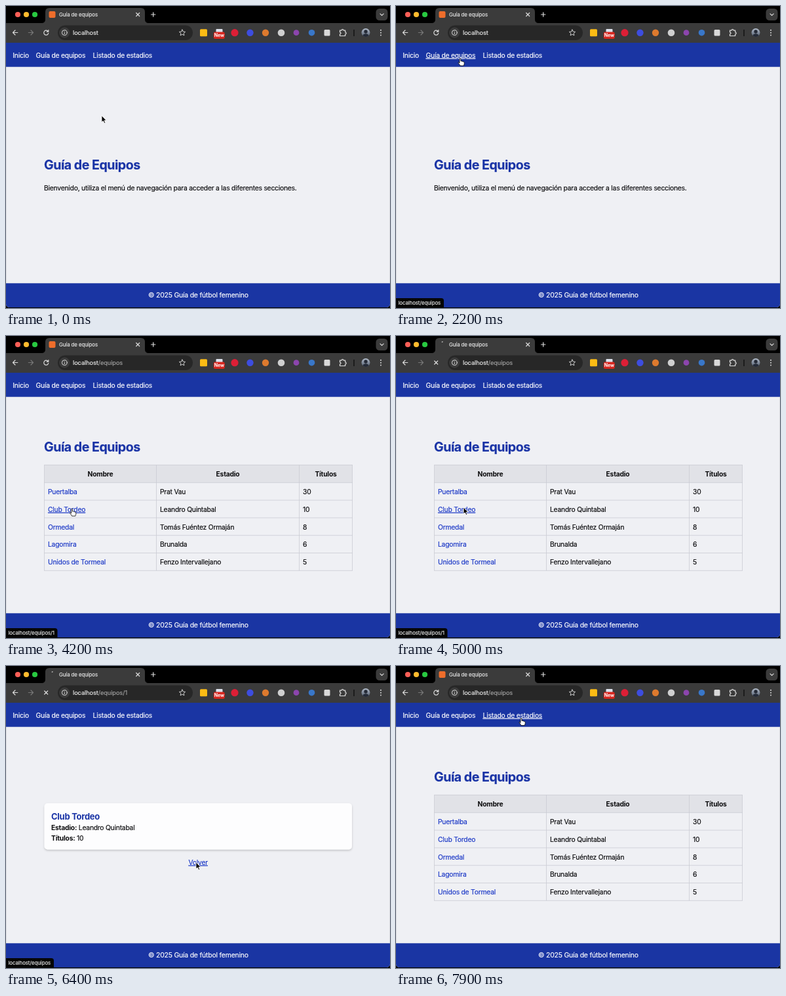
An HTML page that plays this animation: 586 by 460 pixels, repeating every 8 s.

```html
<!DOCTYPE html>
<html lang="es">
<head>
<meta charset="utf-8">
<title>Guía de equipos</title>
<style>
  html, body { margin: 0; width: 100%; height: 100%; overflow: hidden; background: #000; }
  svg { display: block; width: 100%; height: 100%; }
  text {
    font: 10.3px Inter, Roboto, sans-serif; letter-spacing: -.021em; white-space: pre;
    color: #0b0b0d; fill: currentColor; stroke: currentColor; stroke-width: .16;
  }
  .b { font-weight: 700; stroke: none; }
  .mid { text-anchor: middle; }
  .h1 { font-size: 19.6px; font-weight: 700; letter-spacing: -.025em; color: #1a34a6; }
  .h2 { font-size: 13px; font-weight: 700; color: #1a34a6; stroke: none; }
  .white { color: #fff; }
  .link { color: #1a37c6; }
  .ui { font-size: 7.85px; letter-spacing: -.01em; color: #e9e9e9; }
  .url { font-size: 9.16px; letter-spacing: -.005em; color: #f1f1f1; }
  .on { text-decoration: underline; }
  .line { fill: none; stroke: #dcdcdc; stroke-width: 1.2; stroke-linecap: round; stroke-linejoin: round; }
</style>
</head>
<body>
<svg viewBox="0 0 586 460" preserveAspectRatio="none">
  <defs>
    <clipPath id="win"><path d="M0 0H586V454a5 5 0 0 1-5 5H5a5 5 0 0 1-5-5Z"/></clipPath>
    <clipPath id="face"><circle cx="549" cy="40.5" r="6.5"/></clipPath>
    <linearGradient id="photo" x2="0" y2="1"><stop stop-color="#b9c3d0"/><stop offset="1" stop-color="#4a5568"/></linearGradient>
    <filter id="shade" x="-5%" y="-20%" width="110%" height="150%">
      <feDropShadow dx="0" dy="1.6" stdDeviation="1.6" flood-opacity=".2"/>
    </filter>
  </defs>
  <rect width="586" height="460"/>
  <g clip-path="url(#win)">
    <rect y="56" width="586" height="404" fill="#eff0f4"/>
    <path d="M.5 93V422M585.5 93V422" stroke="#dcdde2"/>
    <g id="pages"></g>
    <rect y="55" width="586" height="37.7" fill="#1a35a3"/>
    <rect y="422.3" width="586" height="37.7" fill="#1a35a3"/>
    <g id="nav"></g>
    <text class="white mid" x="293.4" y="444.2" style="font-size:10.46px">© 2025 Guía de fútbol femenino</text>
  </g>

  <g id="chrome">
    <path d="M54 26c4 0 6-2 6-6V9q0-6 6-6H206q6 0 6 6V20c0 4 2 6 6 6H586V55.9H0V26Z" fill="#3b3b3b"/>
    <circle cx="18" cy="13" r="4.1" fill="#fe5f57"/>
    <circle cx="31" cy="13" r="4.1" fill="#febb2e"/>
    <circle cx="44" cy="13" r="4.1" fill="#28c840"/>
    <rect id="favicon" x="65.5" y="8" width="10" height="10" rx="2" fill="#ef6d2b"/>
    <path id="spinner" class="line" d="M70.2 9.1l1-.3" stroke-width="1"/>
    <text class="ui" x="81" y="15.6">Guía de equipos</text>
    <path class="line" d="M198.7 10.5l5 5m0-5l-5 5M221.5 13h6.4M224.7 9.8v6.4"/>
    <rect x="564.5" y="4" width="18" height="18" rx="5.5" fill="#3b3b3b"/>
    <path class="line" d="M571 11.8l2.6 2.6 2.6-2.6"/>

    <path class="line" d="M17.8 40.5H10.6M14 37l-3.5 3.5L14 44"/>
    <path class="line" d="M34.3 40.5h7.2M38 37l3.5 3.5L38 44" style="stroke:#777"/>
    <path id="reload" class="line" d="M64.2 38.8a3.5 3.5 0 1 0 .5 2.6M64.8 36.6v2.6h-2.6"/>
    <path id="stop" class="line" d="M58.7 38l5 5m0-5l-5 5"/>
    <rect x="79" y="29.5" width="206" height="22.5" rx="11.2" fill="#272727"/>
    <circle cx="89.3" cy="40.6" r="8" fill="#3b3b3b"/>
    <circle class="line" cx="89.3" cy="40.6" r="3.9" style="stroke-width:1"/>
    <path class="line" d="M89.3 40.4v2M89.3 38.6v.1" style="stroke-width:1"/>
    <text class="url" x="102" y="43.9">localhost<tspan id="path" style="color:#a3a3a3"></tspan></text>
    <path class="line" d="M269 36l1.4 3 3.2.4-2.4 2.2.7 3.2-2.9-1.6-2.9 1.6.7-3.2-2.4-2.2 3.2-.4Z" style="stroke-width:.9"/>

    <rect x="296" y="35.3" width="11" height="11" rx="1.5" fill="#fbbc14"/>
    <rect x="320.5" y="35" width="10" height="8" rx="1" fill="#dce3ee"/>
    <rect x="316.8" y="39.5" width="17" height="10.5" rx="2.5" fill="#d7261e"/>
    <text class="white mid b" x="325.3" y="47.3" style="font-size:7px">New</text>
    <circle cx="349" cy="40.7" r="5.6" fill="#dc1f36"/>
    <circle cx="372.5" cy="40.7" r="5.2" fill="#3d4de0"/>
    <circle cx="396" cy="40.7" r="5.2" fill="#dd7a2e"/>
    <circle cx="420" cy="40.7" r="5.3" fill="#cfcfcf"/>
    <circle cx="443" cy="40.7" r="4.4" fill="#8b45ad"/>
    <circle cx="466.5" cy="40.7" r="4.8" fill="#3977c9"/>
    <rect x="485.5" y="36" width="9" height="9.5" rx="1.5" fill="#d8d8d8"/>
    <path class="line" d="M509.5 37.2h2.6a1.5 1.5 0 0 1 3 0h2.6v2.7a1.5 1.5 0 0 1 0 3v2.6h-8.2v-2.6a1.5 1.5 0 0 0 0-3Z"/>
    <path d="M531 36v10" stroke="#111" stroke-width="1.4"/>
    <g clip-path="url(#face)">
      <rect x="542" y="33" width="14" height="15" fill="url(#photo)"/>
      <circle cx="549" cy="39" r="2.7" fill="#252b38"/>
      <ellipse cx="549" cy="47" rx="5" ry="4.8" fill="#252b38"/>
    </g>
    <path d="M572 36.8v.1M572 40.6v.1M572 44.4v.1" class="line" style="stroke-width:1.9"/>
  </g>

  <g id="status">
    <path id="plate" fill="#060606"/>
    <text class="ui" x="3.5" y="455"></text>
  </g>
  <g id="pointer">
    <path id="arrow" d="M0 0V10L2.3 8 4 11.6 5.6 10.9 4 7.3H7Z" fill="#000" stroke="#fff" stroke-width=".8"/>
    <path id="hand" d="M-1 7V1a.95.95 0 0 1 1.9 0V4c1.5-.4 2 0 2 .5 1-.3 1.7 0 1.8.6 1-.2 1.5.3 1.5 1V8c0 1-.8 1.7-.9 3H0C-.3 9.5-2.8 7.6-3 6.3c0-.9 1-1 2 .7Z" fill="#fff" stroke="#000" stroke-width=".8"/>
  </g>
</svg>
<script>
const LOOP = 8000, STEP = 100;
const $ = id => document.getElementById(id);
const label = (x, y, s, cls = '', id = '') =>
  `<text x="${x}" y="${y}" class="${cls}"${id && ` id="${id}"`}>${s}</text>`;

const teams = [
  ['Puertalba', 'Prat Vau', 30],
  ['Club Tordeo', 'Leandro Quintabal', 10],
  ['Ormedal', 'Tomás Fuéntez Ormaján', 8],
  ['Lagomira', 'Brunalda', 6],
  ['Unidos de Tormeal', 'Fenzo Intervallejano', 5]
];
const top0 = 196.5, rowH = 26.8, cols = [58.5, 229.5, 447.5, 528.5];

function teamTable() {
  const bottom = top0 + rowH * 6;
  let d = cols.map(x => `M${x} ${top0}V${bottom}`).join('');
  for (let i = 0; i < 7; i++) d += `M58 ${top0 + i * rowH}H529`;
  const heads = ['Nombre', 'Estadio', 'Títulos'].map((s, i) =>
    label((cols[i] + cols[i + 1]) / 2, 214, s, 'b mid'));
  const rows = teams.map((row, r) => row.map((s, c) =>
    label(cols[c] + 5.5, 241 + r * rowH, s, c ? '' : 'link', c ? '' : 'team' + r)).join(''));
  return `<rect x="58.5" y="${top0}" width="470" height="${rowH}" fill="#e1e2e7"/>
    <path d="${d}" stroke="#cbccd3" stroke-width=".8"/>` + heads.join('') + rows.join('');
}

const pages = {
  home: label(58, 249, 'Guía de Equipos', 'h1') +
    label(58, 281, 'Bienvenido, utiliza el menú de navegación para acceder a las diferentes secciones.'),
  list: label(58, 176, 'Guía de Equipos', 'h1') + teamTable(),
  team: `<rect x="58.5" y="209" width="469.5" height="70.5" rx="5" fill="#fdfdfe" filter="url(#shade)"/>` +
    label(69, 233.7, teams[1][0], 'h2') +
    label(69, 249.7, `<tspan class="b">Estadio:</tspan> ${teams[1][1]}`) +
    label(69, 265.5, `<tspan class="b">Títulos:</tspan> ${teams[1][2]}`) +
    label(293.2, 302.6, 'Volver', 'link mid', 'back')
};
$('pages').innerHTML = Object.entries(pages).map(([k, s]) => `<g id="${k}">${s}</g>`).join('');
$('nav').innerHTML = label(10.3, 78.6, 'Inicio', 'white') +
  label(45.6, 78.6, 'Guía de equipos', 'white', 'navTeams') +
  label(132.6, 78.6, 'Listado de estadios', 'white', 'navGrounds');

// time, x, y of the pointer
const track = [
  [0, 146, 167], [300, 146, 167], [500, 143.7, 167], [800, 143.7, 167],
  [1700, 98, 80], [2600, 98, 80], [3500, 90.5, 271.5], [4400, 102, 262],
  [4500, 102, 262], [4700, 103, 261], [5100, 103, 261], [5500, 126, 285],
  [5700, 136, 287], [6200, 290, 299], [6600, 290, 299], [7500, 194, 118], [7800, 191, 79.5]
];

// changes of state; each step keeps what it does not name
const steps = [
  [0, { page: 'home', path: '', hover: '', hand: false, status: '', busy: false }],
  [1600, { hover: 'navTeams', hand: true }],
  [1800, { status: '/equipos' }],
  [2400, { busy: true, hand: false }],
  [2700, { page: 'list', path: '/equipos', busy: false, hover: '' }],
  [3400, { hand: true }],
  [3700, { hover: 'team1', status: '/equipos/1' }],
  [4900, { busy: true, hand: false }],
  [5200, { page: 'team', path: '/equipos/1', busy: false, hover: '', status: '' }],
  [6200, { hover: 'back', hand: true, status: '/equipos' }],
  [6400, { busy: true, hand: false }],
  [6600, { page: 'list', path: '/equipos', busy: false, hover: '' }],
  [6700, { status: '' }],
  [7700, { hover: 'navGrounds', hand: true }]
];

const ease = u => u * u * (3 - 2 * u);
const show = (id, on) => $(id).style.display = on ? '' : 'none';

function place(t) {
  const i = track.findIndex(k => k[0] > t);
  if (i < 0) return track[track.length - 1].slice(1);
  const [a, b] = [track[i - 1], track[i]];
  const u = ease((t - a[0]) / (b[0] - a[0]));
  return [a[1] + (b[1] - a[1]) * u, a[2] + (b[2] - a[2]) * u];
}

function draw(now) {
  const t = Math.floor(now % LOOP / STEP) * STEP;
  const s = Object.assign({}, ...steps.filter(k => k[0] <= t).map(k => k[1]));
  for (const k in pages) show(k, k === s.page);
  for (const id of ['navTeams', 'navGrounds', 'team1', 'back'])
    $(id).classList.toggle('on', id === s.hover);
  $('path').textContent = s.path;
  show('favicon', !s.busy);
  show('reload', !s.busy);
  show('spinner', s.busy);
  show('stop', s.busy);
  show('status', s.status);
  const w = s.status === '/equipos/1' ? 78.5 : 73;
  $('plate').setAttribute('d', `M0 445H${w - 4}q4 0 4 4V460H0Z`);
  $('status').lastElementChild.textContent = 'localhost' + s.status;
  show('arrow', !s.hand);
  show('hand', s.hand);
  $('pointer').setAttribute('transform', `translate(${place(t)})`);
}

const start = performance.now();
function tick() {
  draw(performance.now() - start);
  requestAnimationFrame(tick);
}
tick();
</script>
</body>
</html>
```
